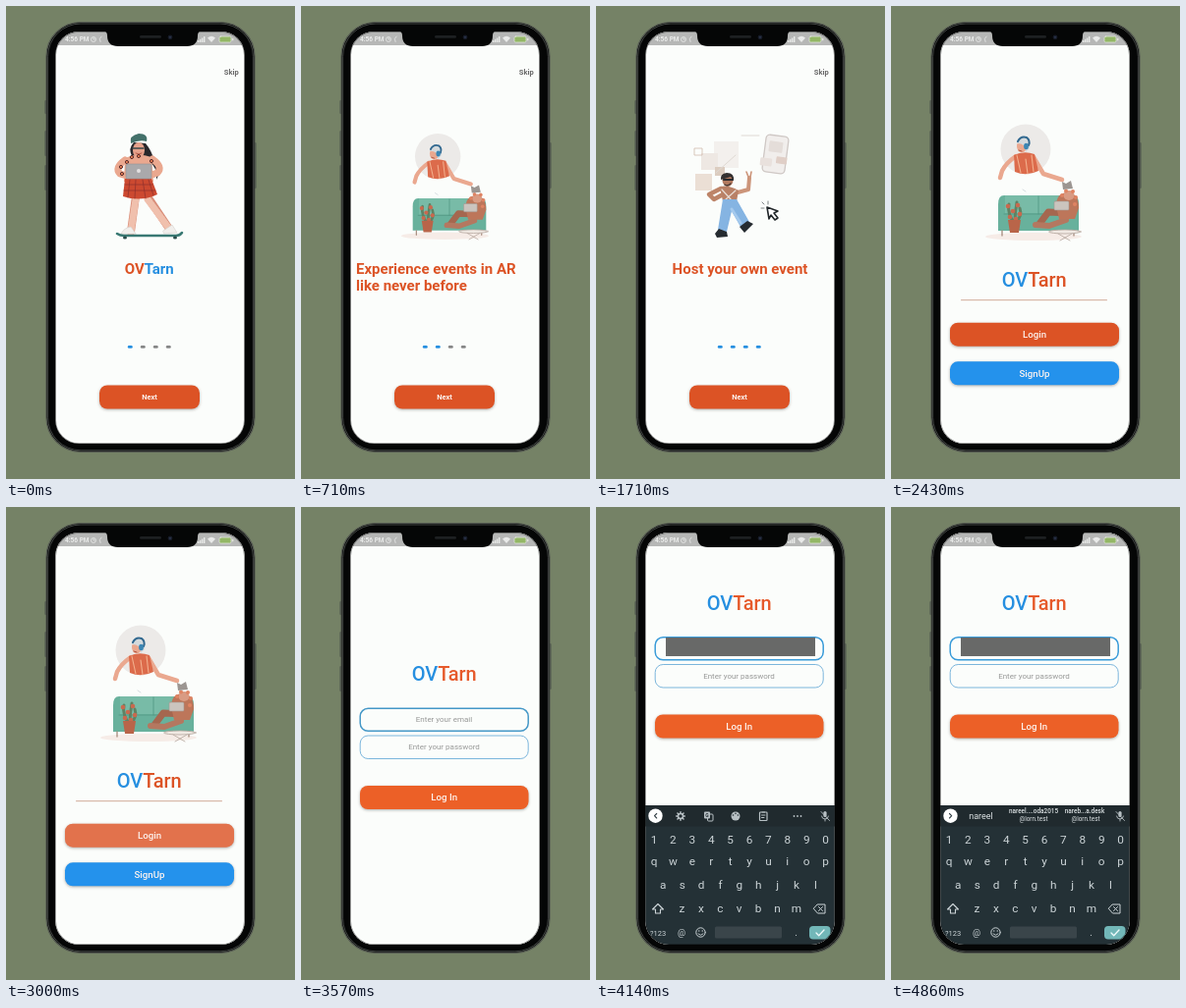
An HTML page with a canvas that plays this animation: 294 by 482 pixels, repeating every 5010 ms.

```html
<!DOCTYPE html>
<html lang="en">
<head>
<meta charset="utf-8">
<title>Event app walkthrough</title>
<style>
html, body { margin: 0; width: 100%; height: 100%; overflow: hidden; background: #758266; }
canvas { display: block; width: 294px; height: 482px; }
</style>
</head>
<body>
<canvas id="stage"></canvas>
<script>
const LOOP = 5010, W = 294, H = 482;
const ORANGE = '#dc5325', BLUE = '#268fe0', PAPER = '#fbfdfb', SKIN = '#eaa88f';
const canvas = document.getElementById('stage');
const dpr = window.devicePixelRatio || 1;
canvas.width = W * dpr;
canvas.height = H * dpr;
const c = canvas.getContext('2d');

const ramp = (a, b, v) => Math.min(1, Math.max(0, (v - a) / (b - a)));
const easeOut = p => 1 - (1 - p) ** 3;

function box(x, y, w, h, r, fill, stroke, lw = 1) {
  c.beginPath();
  c.roundRect(x, y, w, h, r);
  paint(fill, stroke, lw);
}
function paint(fill, stroke, lw = 1) {
  if (fill) { c.fillStyle = fill; c.fill(); }
  if (stroke) { c.strokeStyle = stroke; c.lineWidth = lw; c.stroke(); }
}
function oval(x, y, rx, ry, fill, stroke, lw) {
  c.beginPath();
  c.ellipse(x, y, rx, ry, 0, 0, 7);
  paint(fill, stroke, lw);
}
function shape(d, fill, stroke, lw) {
  const path = new Path2D(d);
  if (fill) { c.fillStyle = fill; c.fill(path); }
  if (stroke) {
    c.strokeStyle = stroke; c.lineWidth = lw || 1;
    c.lineCap = c.lineJoin = 'round';
    c.stroke(path);
  }
}
function line(d, color, lw) { shape(d, null, color, lw); }
function text(s, x, y, size, color, weight = 400, align = 'center') {
  c.font = `${weight} ${size}px Roboto, sans-serif`;
  c.textAlign = align;
  c.fillStyle = color;
  c.fillText(s, x, y);
}
function group(alpha, dx, dy, draw, scale = 1) {
  if (alpha <= 0) return;
  c.save();
  c.globalAlpha *= alpha;
  c.translate(dx, dy);
  c.scale(scale, scale);
  draw();
  c.restore();
}
function brand(y, size, weight, first, second) {
  c.font = `${weight} ${size}px Roboto, sans-serif`;
  const a = c.measureText('OV').width, b = c.measureText('Tarn').width;
  const x = 145.7 - (a + b) / 2;
  text('OV', x, y, size, first, weight, 'left');
  text('Tarn', x + a, y, size, second, weight, 'left');
}
function button(label, x, y, w, color, size, weight, pressed) {
  c.save();
  c.shadowColor = 'rgba(70,60,55,.4)';
  c.shadowBlur = 3 * dpr;
  c.shadowOffsetY = dpr;
  box(x, y, w, 24, 8, color);
  c.restore();
  if (pressed) box(x, y, w, 24, 8, 'rgba(255,255,255,.18)');
  text(label, x + w / 2, y + 12 + size * .36, size, '#fdf3ef', weight);
}

function skater() {
  line('M132 194L127 230', '#d98f7b', 8);
  line('M144 194L166 227', '#d98f7b', 8);
  c.save();
  c.setLineDash([1, 2]);
  line('M132 197L127 230M144 197L166 227', '#f0c0ad', 7);
  c.restore();
  shape('M117 232Q120 226 127 225L132 232ZM160 229L169 223L174 231L161 232Z', '#f1efec', '#d5d1cd', .6);
  line('M113 232Q116 234 120 234H173Q177 234 179 231', '#397973', 2.6);
  for (const x of [121, 172]) oval(x, 236, 2, 1.6, '#284b49');
  shape('M130 139Q124 145 128 153L145 159Q154 163 153 177Q158 170 151 158Q148 147 142 140Z', '#29272b');
  shape('M121 155Q133 149 148 154L150 179H120Z', SKIN);
  line('M121 157Q110 165 116 171L126 174M149 156Q160 164 154 170L143 174', SKIN, 7);
  oval(135, 147, 6, 8, '#e6a28c');
  line('M132 150Q135 152 138 150', '#a94837', .8);
  line('M129 145H140', '#38484a', 1.4);
  shape('M127 140Q125 132 135 130Q145 130 143 138Q136 136 127 140Z', '#43716a');
  for (const [x, y] of [[117, 164], [123, 159], [128, 154], [118, 171], [148, 158], [135, 153]])
    oval(x, y, 1.6, 1.6, '#f08458', '#5b2d2c', 1);
  shape('M121 176H148L154 192Q137 200 119 194Z', '#cc4930');
  line('M126 177L124 195M132 177L131 196M139 177L142 196M145 177L150 193M121 182H149M120 188H152', '#8d302b', .7);
  box(122, 161, 26, 15, 1.5, '#aaa9ab', '#929195', .6);
  oval(135, 168, 2, 2, '#e3e1e1');
}

function sofaScene() {
  oval(137, 146, 25.5, 25.5, '#eceae8');
  oval(145, 235, 49, 4, '#f6ece7');
  shape('M109 202Q109 193 115 193H186Q191 193 191 202V229H109Z', '#68b19c');
  shape('M116 193H184V211H116Z', '#78bba7');
  line('M115 212H186M150 194V212', '#529783', .8);
  line('M113 229V234M186 229V234', '#a58a7c', 1.3);

  line('M127 153Q117 160 113 168L111 175', SKIN, 4.5);
  line('M145 154L155 171L174 177', SKIN, 4.5);
  shape('M125 152Q135 147 146 151L150 168Q138 174 126 169Z', '#dc6b4b');
  line('M128 152L132 170M143 152L145 169M137 156L139 171', '#f3b08e', 1.1);
  oval(133, 143, 5, 6.5, SKIN);
  shape('M128 140Q128 133 136 134Q143 136 141 145L137 149Q138 140 128 140Z', '#d4dadd');
  line('M129 138Q132 132 138 134Q142 137 140 142', '#31688f', 2);
  oval(137.5, 143, 2.4, 3.2, '#3b86b3');
  line('M130 147L133 148', '#a84936', .9);

  line('M126 222Q118 212 120 202M126 222Q126 210 128 200M126 222Q134 214 131 206', '#5f8264', 3);
  for (const [x, y] of [[119, 204], [124, 209], [129, 203], [131, 212], [121, 215], [127, 217]])
    oval(x, y, 2.3, 2.3, '#c9694e');
  shape('M119 218H132L130 231H121Z', '#b96549');

  line('M182 211L160 210L151 222', '#a5674f', 7);
  line('M178 218L161 224L147 223', '#b47860', 6);
  shape('M168 204Q168 190 180 190Q191 191 191 206L187 217H171Z', '#bd765a');
  oval(181, 193, 5.5, 5, '#d99b83');
  for (const [x, y] of [[174, 193], [178, 188.5], [185, 189], [188, 195], [187, 202]])
    oval(x, y, 2, 2, '#df8463');
  box(166, 199, 15, 9, 1, '#cbc4be', '#a39993', .6);
  shape('M175 187L174 179L178 181L183 178L185 186Z', '#9c9692');

  oval(177, 230, 16.5, 2, '#f1e9e3', '#b3a59c', .8);
  line('M170 232L182 239M184 232L172 239', '#b3a59c', .8);
  line('M134 187L137 189', '#d4dce0', 1);
}

function hostScene() {
  box(120, 138, 25, 27, 0, '#f3f0ed');
  box(107, 150, 17, 17, 0, '#eee8e3');
  box(101, 171, 17, 17, 0, '#ebdfd5');
  box(121, 164, 10, 9, 0, '#dccdc0');
  box(100, 145, 8, 7, 0, null, '#d1bbae', .8);
  line('M148 132H166M122 170L142 152', '#dfd9d3', 1);
  c.save();
  c.translate(182, 151);
  c.rotate(.13);
  box(-11, -19, 23, 38, 4, '#f1eeec', '#cfc8c5', 1.3);
  box(-7, -13, 14, 11, 1, '#e4ddd9');
  box(2, 2, 11, 7, 1, '#e0cfc7');
  box(-14, 5, 12, 8, 1, '#e9e1dd');
  c.restore();

  line('M127 186L115 192L120 197L131 191', '#bd8468', 4.5);
  line('M144 190L155 187L156 175', '#cc957a', 4);
  line('M155 174L153 169M157 174L158 169', '#cc957a', 1.6);
  shape('M126 184Q135 182 145 188L143 199H129Z', '#b98167');
  line('M128 187L138 198M142 188L131 198', '#e8dcd4', 1.2);
  shape('M129 197H143L156 220L147 225L138 209L133 230L124 228Z', '#85b4e2');
  line('M138 207L147 221', '#a4c9ed', 3);
  shape('M121 232L125 227L133 230L134 235L123 236ZM146 225L154 219L160 222L151 231Z', '#252b30');
  oval(134, 177.5, 5.5, 6.5, '#b27a60');
  shape('M127 177Q126 171 133 170Q141 170 140 178L137 174Z', '#34302f');
  line('M130 177H139', '#2a2b2e', 2.2);
  line('M131 182Q134 184 137 181', '#4a3b35', 1.4);
  shape('M174 205L185 209L181 211L185 216L182 218L178 213L176 217Z', '#fff', '#22272a', 1.6);
  line('M171 202L169 200M175 202V199M171 206L168 206', '#6e7478', .9);
}

function dots(count) {
  for (let i = 0; i < 4; i++)
    box(123.8 + i * 13, 346, 5, 2.8, 1.4, i < count ? BLUE : '#858686');
}
function firstPage() {
  skater();
  brand(272.8, 15, 700, ORANGE, BLUE);
}
function secondPage() {
  group(1, 14.5, 20.4, sofaScene, .91);
  text('Experience events in AR', 56, 272.8, 15, ORANGE, 700, 'left');
  text('like never before', 56, 290, 15, ORANGE, 700, 'left');
}
function thirdPage() {
  hostScene();
  text('Host your own event', 146.5, 272.8, 15, ORANGE, 700);
}
function onboarding(tick) {
  const toSecond = ramp(0, 2, tick), toThird = ramp(5, 9, tick);
  text('Skip', 229.2, 70, 7.5, '#6a6a6a', 700);
  group(1 - toSecond, 0, 0, firstPage);
  group(toSecond * (1 - ramp(5, 7, tick)), 0, 0, secondPage);
  group(toThird, 0, 0, thirdPage);
  dots(tick < 1 ? 1 : tick < 6 ? 2 : tick < 11 ? 3 : 4);
  button('Next', 95, 386.5, 102, ORANGE, 7.5, 700, [1, 6, 11, 13].includes(tick));
}
function welcome(tick) {
  box(50, 40, 193, 406, 0, PAPER);
  sofaScene();
  brand(286, 20, 500, BLUE, ORANGE);
  line('M71.5 299.7H219.5', '#d1aa98', 1);
  button('Login', 60, 322.7, 172, ORANGE, 9.7, 500, tick === 20 || tick === 21);
  button('SignUp', 60, 362.3, 172, '#2492ec', 9.7, 500);
}
function form(tick) {
  box(50, 40, 193, 480, 0, PAPER);
  brand(177, 20, 500, BLUE, '#e65a2b');
  box(60.2, 205.3, 171, 23, 8, PAPER, tick > 25 ? '#399bd9' : '#4598c7', 1.5);
  box(60.2, 233, 171, 23.5, 8, PAPER, '#7bb6dc', 1);
  if (tick < 28) text('Enter your email', 145.5, 219, 8, '#989998');
  else box(71, 205.5, 152, 19, 0, '#686968');
  text('Enter your password', 145.5, 247, 8, '#989998');
  button('Log In', 60, 284, 171.5, '#ec6027', 9.7, 500);
}

function toolbar() {
  const ink = '#b7c0c4';
  for (let i = 0; i < 8; i++) {
    const a = i * Math.PI / 4;
    line(`M${86 + 3 * Math.cos(a)} ${315 + 3 * Math.sin(a)}L${86 + 4.3 * Math.cos(a)} ${315 + 4.3 * Math.sin(a)}`, ink, 1.5);
  }
  oval(86, 315, 2.5, 2.5, null, ink, 1.5);
  box(110, 310.5, 6, 7, 1, ink);
  box(113.5, 313, 5.5, 7, 1, null, ink, 1);
  text('G', 113, 316.3, 5, '#202b30', 700);
  oval(142, 315, 4.5, 4.5, ink);
  for (const [x, y] of [[139.5, 314], [142, 312.3], [144.4, 314]]) oval(x, y, .8, .8, '#202b30');
  box(166.5, 311, 7.5, 8.5, .8, null, ink, 1.2);
  line('M169 311H171.7M168.5 314H172M168.5 316.5H171', ink, 1);
  for (const x of [201.5, 205, 208.5]) oval(x, 315, .9, .9, ink);
}
function suggestions() {
  const ink = '#dce2e4';
  text('nareel', 91.5, 318, 9, ink);
  text('nareel....oda2015', 145, 311.5, 6.4, ink, 500);
  text('nareb...a.desk', 197, 311.5, 6.4, ink, 500);
  for (const x of [145, 198]) text('@lorn.test', x, 320, 6.4, ink);
}
function keyboard(tick) {
  const ink = '#cbd3d6';
  box(50, 304, 193, 146, 0, '#243136');
  box(50, 304, 193, 21.5, 0, '#202a2e');
  oval(60.5, 314.7, 7.2, 7.2, '#fff');
  const suggesting = tick >= 31;
  line(suggesting ? 'M59.5 312.5L61.7 314.7L59.5 317' : 'M61.7 312.5L59.5 314.7L61.7 317', '#344046', 1.1);
  if (suggesting) suggestions(); else toolbar();
  box(231.4, 310, 3.2, 6, 1.6, '#b7c0c4');
  line('M229.5 315Q230 318 233 318Q236 318 236.5 315M233 318V320M229 310.5L237.5 319.5', '#b7c0c4', .9);
  const rows = [['1234567890', 59, 343], ['qwertyuiop', 59, 365], ['asdfghjkl', 68.3, 388.5], ['zxcvbnm', 87.5, 413]];
  for (const [keys, x, y] of rows)
    [...keys].forEach((key, i) => text(key, x + i * 19.4, y, 11.8, ink));
  line('M63 404.5L68.5 410H65.5V414H60.5V410H57.5Z', ink, 1.1);
  line('M225.5 405H233V414H225.5L221.5 409.5ZM226.5 407.5L230.5 411.5M230.5 407.5L226.5 411.5', ink, 1);
  text('?123', 63, 437, 7.5, ink);
  text('@', 87, 437, 9, ink);
  oval(106.5, 433.5, 4.7, 4.7, null, ink, 1);
  for (const x of [104.8, 108.2]) oval(x, 432, .7, .7, ink);
  line('M104 435Q106.5 437.7 109 435', ink, .9);
  box(121, 427.5, 68, 12, 1.5, '#3a454a');
  text('.', 203.5, 437, 10, ink);
  box(217, 427, 21.5, 13.5, 4, '#72b7b8');
  line('M224 434L226.7 436.7L232 431', '#eefafa', 1.3);
}

function statusBar() {
  const ink = '#e9eae9';
  box(50, 26, 193, 14, 0, '#b6b7b6');
  text('4:56 PM', 60, 36.3, 6.5, ink, 700, 'left');
  oval(89, 34, 2.5, 2.5, null, ink, .8);
  line('M89 32.5V34H90.3M96 36.5Q94 33 97 31', ink, .8);
  for (let i = 0; i < 4; i++) box(195 + i * 2, 35 - i * 1.3, 1.4, 2 + i * 1.3, 0, ink);
  shape('M205 32.5Q209 29 213 32.5L209 37Z', ink);
  box(217, 31, 12, 6, 1.5, '#93b765', '#dfe4d8', .8);
  box(230, 32.8, 1.4, 2.4, .5, '#dfe4d8');
}
function notch() {
  shape('M99 25H199Q195 26 195 30Q195 41 184 41H114Q103 41 103 30Q103 26 99 25Z', '#050606');
  box(136, 30, 22, 2.8, 1.4, '#1d2022');
  oval(167, 31.8, 2.4, 2.4, '#171c28');
  oval(167, 31.8, .9, .9, '#303a57');
}

function phone(tick) {
  for (const [x, y, h] of [[39.5, 96, 14], [39.5, 127, 26], [39.5, 162, 26], [252.5, 139, 47]])
    box(x, y, 2, h, 1, '#4d524a');
  box(41, 16.5, 212, 437.8, 35, '#050606', '#545951', 1.2);
  box(42.6, 18, 208.8, 434.8, 33.5, null, '#6e7270', .6);
  c.save();
  c.beginPath();
  c.roundRect(50.3, 26, 192.4, 420, 24);
  c.clip();
  c.fillStyle = PAPER;
  c.fillRect(50, 26, 193, 420);

  const toWelcome = ramp(13, 17, tick), toForm = ramp(21, 24, tick), lift = easeOut(ramp(25, 27, tick));
  if (toWelcome < 1) onboarding(tick);
  if (toForm < 1) group(toWelcome, 0, 24 * (1 - easeOut(toWelcome)), () => welcome(tick));
  group(toForm, 0, 24 * (1 - easeOut(toForm)) - 72.5 * lift, () => form(tick));
  if (lift > 0) group(1, 0, 142 * (1 - lift), () => keyboard(tick));
  statusBar();
  box(50.3, 26, 192.4, 420, 24, null, 'rgba(5,6,6,.45)', 1.4);
  c.restore();
  notch();
}

function frame(now) {
  const tick = Math.min(34, Math.floor((now % LOOP + 5) * 7 / 1000));
  c.setTransform(dpr, 0, 0, dpr, 0, 0);
  c.fillStyle = '#758266';
  c.fillRect(0, 0, W, H);
  phone(tick);
}

const start = performance.now();
function loop() {
  frame(performance.now() - start);
  requestAnimationFrame(loop);
}
loop();
</script>
</body>
</html>
```
